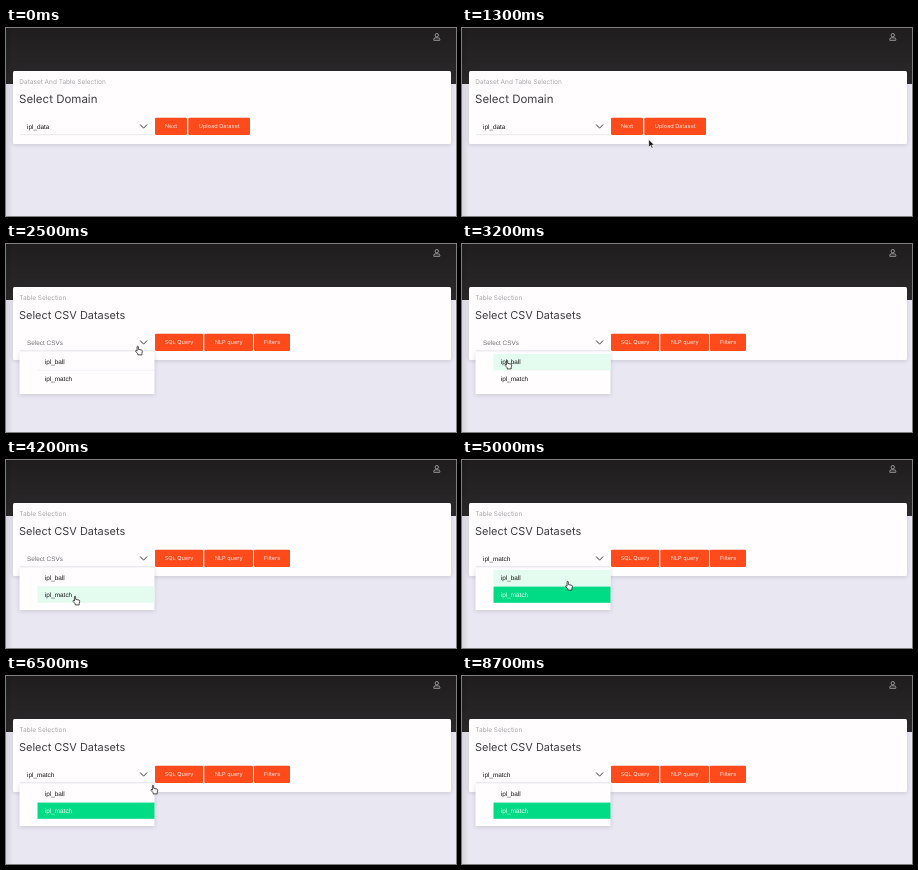
Recreate the animation shown at these times as an HTML page. Size 450 by 188 pixels, loop 9.1 s.

```html
<!DOCTYPE html>
<html lang="en">
<head>
<meta charset="utf-8">
<title>Dataset selection</title>
<style>
  html, body { margin: 0; width: 100%; height: 100%; overflow: hidden; background: #e9e7f1; }
  svg { display: block; width: 100%; height: 100%; }
  text { text-rendering: geometricPrecision; font-family: Inter, sans-serif; }
  .caption { font-size: 6.5px; fill: #a9a7aa; }
  .title { font-size: 11.5px; fill: #3f3e40; }
  .title.long { font-size: 10.95px; }
  .button rect { fill: #ff4a1c; }
  .button.hover rect { fill: #ff6438; }
  .button text { font-size: 5.6px; fill: #ffe6dd; text-anchor: middle; }
  .field { font: 6.4px "Liberation Sans", Arial, sans-serif; fill: #151515; }
  .field.empty { fill: #77757a; }
  .row rect { fill: transparent; }
  .row.hover rect { fill: #e4fcf0; }
  .row.selected rect { fill: #00db86; }
  .row.selected text { fill: #e9fff5; }
  .card { filter: drop-shadow(0 1px 2px rgba(40, 35, 70, .16)); }
</style>
</head>
<body>
<svg viewBox="0 0 450 188" preserveAspectRatio="none">
  <defs>
    <linearGradient id="dark" x2="0" y2="1">
      <stop stop-color="#1f1d1e"/><stop offset="1" stop-color="#2b292a"/>
    </linearGradient>
    <linearGradient id="edge">
      <stop stop-color="#000" stop-opacity=".09"/><stop offset="1" stop-color="#000" stop-opacity="0"/>
    </linearGradient>
  </defs>
  <rect width="450" height="188" fill="#e9e7f1"/>
  <rect width="450" height="56" fill="url(#dark)"/>
  <rect width="7" height="188" fill="url(#edge)"/>
  <g fill="none" stroke="#b5b3b5" stroke-width=".8">
    <circle cx="430.8" cy="7.2" r="1.7"/>
    <path d="M427.8 12.3v-.8q0-1.7 1.7-1.7h2.6q1.7 0 1.7 1.7v.8z"/>
  </g>
  <rect class="card" x="7" y="43" width="438" height="73" rx="1.5" fill="#fffdfe"/>

  <g id="domainPage">
    <text class="caption" x="13.3" y="56">Dataset And Table Selection</text>
    <text class="title" x="13" y="74.6">Select Domain</text>
  </g>
  <g id="csvPage">
    <text class="caption" x="13.3" y="56">Table Selection</text>
    <text class="title long" x="13" y="74.6">Select CSV Datasets</text>
    <rect class="card" x="13.5" y="107.5" width="135" height="42.5" rx="1" fill="#fffdfe"/>
    <path d="M32 126.3h116" stroke="#efedf1" stroke-width=".6"/>
  </g>
  <path d="M14 106.7h134" stroke="#e3e1e5" stroke-width=".7"/>
  <text class="field" id="value" x="21" y="100.8"></text>
  <path d="M134 96.4l3.6 3.8 3.6-3.8" fill="none" stroke="#39383a" stroke-width=".9"/>

  <g id="pointer">
    <path id="arrow" d="M.4.4v7.7l1.8-1.6 1.2 2.7 1.3-.6-1.2-2.6h2.4z" fill="#171717" stroke="#fff" stroke-width=".6"/>
    <path id="hand" d="M-.6 5V.9q0-.7.6-.7t.7.7v2.5l3 .6q1 .2 1 1.2l-.5 2.4v1.3H.2V7.8L-2 5.3q-.2-.8.5-.8z" fill="#fff" stroke="#222" stroke-width=".8" stroke-linejoin="round"/>
  </g>
</svg>
<script>
const LOOP = 9100, STEP = 100;
const PAGE_AT = 1600, PICK_AT = 4400, POINTER_IN = 500, POINTER_OUT = 8000;

// time, x, y of the pointer's hot spot
const PATH = [
  [500, 236, 140], [900, 236, 140], [1200, 196, 116], [1500, 167, 101],
  [1800, 167, 99], [1900, 166, 99], [2300, 160, 101], [2900, 75, 104],
  [3200, 45, 116], [3500, 52, 124], [3700, 62, 138], [3900, 58, 127],
  [4200, 69, 136], [4600, 69, 136], [4900, 90, 122], [5500, 184, 117],
  [6000, 184, 117], [6400, 165, 108], [6500, 147, 109], [6600, 100, 128],
  [6700, 61, 129], [6900, 183, 132], [7800, 183, 132], [7900, 272, 169]
];

const $ = id => document.getElementById(id);
const show = (el, on) => { el.style.display = on ? '' : 'none'; };

function addBox(parent, kind, label, x, y, w, h, textX, textY) {
  const make = (tag, attrs, to) => {
    const el = document.createElementNS('http://www.w3.org/2000/svg', tag);
    for (const key in attrs) el.setAttribute(key, attrs[key]);
    return to.appendChild(el);
  };
  const el = make('g', { class: kind }, $(parent));
  make('rect', { x, y, width: w, height: h, rx: kind === 'button' ? 1.2 : 0 }, el);
  make('text', { x: textX, y: textY, class: kind === 'row' ? 'field' : '' }, el).textContent = label;
  const contains = (px, py) => px >= x && px < x + w && py >= y && py < y + h;
  return { el, parent, contains };
}

const addButton = (page, label, x, w) =>
  addBox(page, 'button', label, x, 89.8, w, 17.2, x + w / 2, 100.4);
const addRow = (label, y) =>
  addBox('csvPage', 'row', label, 31.5, y, 117, 16.2, 38.8, y + 10.4);

const ball = addRow('ipl_ball', 110);
const match = addRow('ipl_match', 126.6);
const boxes = [
  addButton('domainPage', 'Next', 149, 32),
  addButton('domainPage', 'Upload Dataset', 182.3, 61.7),
  addButton('csvPage', 'SQL Query', 149, 48.2),
  addButton('csvPage', 'NLP query', 198.3, 48.7),
  addButton('csvPage', 'Filters', 248, 36),
  ball, match
];

function pointerAt(t) {
  const next = PATH.findIndex(key => key[0] > t);
  if (next < 0) return PATH[PATH.length - 1].slice(1);
  if (next === 0) return PATH[0].slice(1);
  const [a, b] = [PATH[next - 1], PATH[next]];
  const k = (t - a[0]) / (b[0] - a[0]);
  return [a[1] + (b[1] - a[1]) * k, a[2] + (b[2] - a[2]) * k];
}

function draw(now) {
  const t = Math.floor((now % LOOP) / STEP) * STEP;
  const csv = t >= PAGE_AT, picked = t >= PICK_AT;
  const page = csv ? 'csvPage' : 'domainPage';
  const visible = t >= POINTER_IN && t < POINTER_OUT;
  const [x, y] = pointerAt(t);

  show($('domainPage'), !csv);
  show($('csvPage'), csv);
  $('value').textContent = !csv ? 'ipl_data' : picked ? 'ipl_match' : 'Select CSVs';
  $('value').classList.toggle('empty', csv && !picked);

  const onField = x >= 13 && x < 149 && y >= 89 && y < (csv ? 150 : 107);
  let clickable = onField;
  for (const box of boxes) {
    const hover = visible && box.parent === page && box.contains(x, y);
    box.el.classList.toggle('hover', hover);
    clickable = clickable || hover;
  }
  match.el.classList.toggle('selected', picked);

  show($('pointer'), visible);
  show($('hand'), clickable);
  show($('arrow'), !clickable);
  $('pointer').setAttribute('transform', `translate(${x} ${y})`);
}

const start = performance.now();
function tick() {
  draw(performance.now() - start);
  requestAnimationFrame(tick);
}
tick();
</script>
</body>
</html>
```
